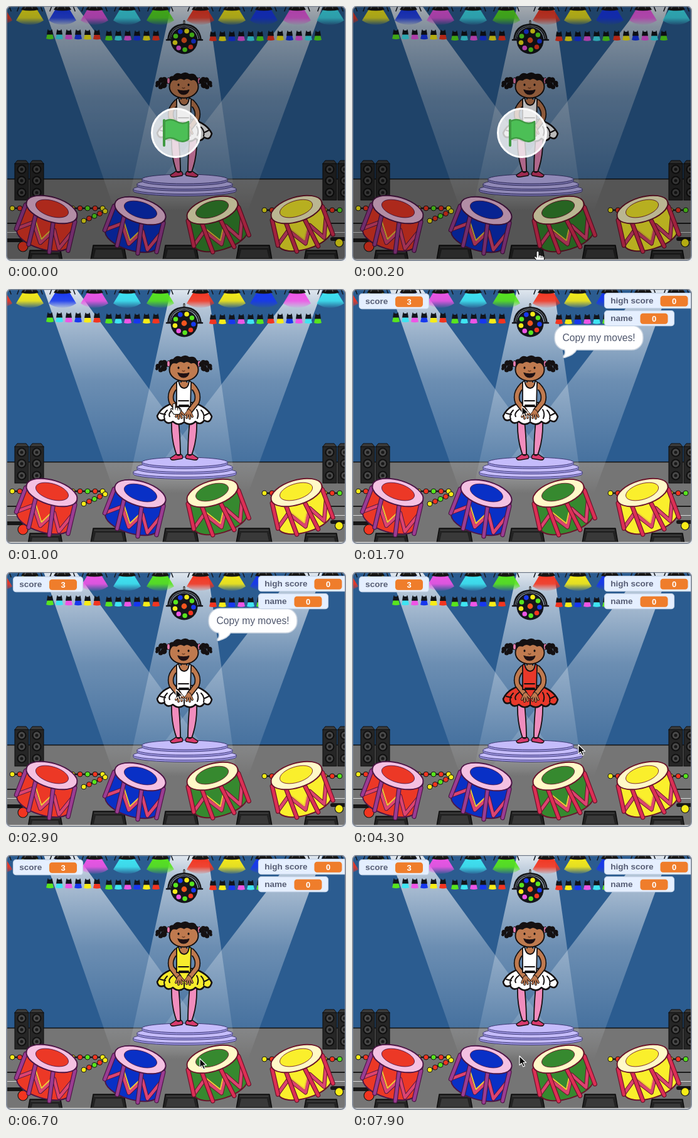
Animation of 542 by 406 pixels, one loop 8000 ms. Source, as an HTML page:

```html
<!DOCTYPE html>
<html lang="en">
<head>
<meta charset="utf-8">
<title>Copy my moves</title>
<style>
  html, body { margin: 0; width: 100%; height: 100%; overflow: hidden; background: #e9ebef; }
  svg { display: block; width: 542px; height: 406px; }
  text { font-family: "Liberation Sans", Arial, sans-serif; }
  .label { font-size: 13.5px; font-weight: bold; fill: #575e75; }
  .value { font-size: 13px; font-weight: bold; fill: #fff; text-anchor: middle; }
</style>
</head>
<body>
<svg id="stage" viewBox="0 0 542 406" xmlns="http://www.w3.org/2000/svg"></svg>
<script>
const LOOP = 8000;
const C = { red: '#f23520', yellow: '#f7ec18', blue: '#1738ee', magenta: '#ee55e6', cyan: '#3fe4f2', green: '#58e51e' };
const HUES = ['red', 'yellow', 'blue', 'magenta', 'cyan', 'green'];

const attrs = o => Object.entries(o).map(([k, v]) => ` ${k}="${v}"`).join('');
const el = (tag, o, inner = '') => `<${tag}${attrs(o)}>${inner}</${tag}>`;
const path = (d, fill, stroke = 'none', width = 1, more = {}) =>
  el('path', { d, fill, stroke, 'stroke-width': width, 'stroke-linejoin': 'round', 'stroke-linecap': 'round', ...more });
const line = (d, stroke, width, more) => path(d, 'none', stroke, width, more);
const rect = (x, y, width, height, fill, more = {}) => el('rect', { x, y, width, height, fill, ...more });
const oval = (cx, cy, rx, ry, fill, more = {}) => el('ellipse', { cx, cy, rx, ry, fill, ...more });
const dot = (x, y, r, fill, more) => oval(x, y, r, r, fill, more);
const group = (inner, o = {}) => el('g', o, inner);
const at = (x, y, inner) => group(inner, { transform: `translate(${x} ${y})` });

function fade(id, y1, y2, stops) {
  const inner = stops.map(([offset, color, alpha]) =>
    el('stop', { offset, 'stop-color': color, 'stop-opacity': alpha })).join('');
  return el('linearGradient', { id, gradientUnits: 'userSpaceOnUse', x1: 0, x2: 0, y1, y2 }, inner);
}

function defs() {
  const beam = fade('beam', 0, 325, [[0, '#fff', .86], [.1, '#f4f6f8', .68], [.45, '#e4ebf2', .35], [.84, '#dce6f0', .16], [1, '#fff', 0]]);
  const glows = HUES.map(h => fade('glow-' + h, 4, 31, [[0, C[h], 1], [.55, C[h], .9], [1, C[h], 0]])).join('');
  const clip = el('clipPath', { id: 'round' }, rect(1, 0, 540, 405, '#fff', { rx: 7 }));
  return el('defs', {}, beam + glows + clip);
}

const beams = () => ['M60 0H112L300 258L349 325H173Z', 'M263 0H322L368 325H192Z', 'M460 0H505L386 325H211L262 258Z']
  .map(d => path(d, 'url(#beam)')).join('');

function bigLamp(x, hue) {
  return at(x, 0,
    path('M-11 5H11L22 23Q12 30 0 30Q-12 30 -22 23Z', `url(#glow-${hue})`) +
    path('M-9 -2H9L14 6Q0 9 -14 6Z', '#151515') +
    line('M-6 0L-8 4M3 0L4 4', '#777', 1) +
    line('M-17 0L-20 8M17 0L20 8', '#151a22', 1.6));
}

function smallLamp(x, y, hue) {
  return at(x, y,
    path('M-4 5H4L6 13Q0 15 -6 13Z', C[hue]) +
    path('M-4 0H4L5 6.5H-5Z', '#12151b') + line('M-3 -1V2M3 -1V2', '#12151b', 1.5));
}

function lamps() {
  const big = [38, 90, 141, 193, 246, 310, 360, 411, 464, 517];
  const bigHues = ['yellow', 'blue', 'magenta', 'cyan', 'green', ...HUES.slice(0, 5)];
  let s = bigLamp(-12, 'red') + big.map((x, i) => bigLamp(x, bigHues[i])).join('');
  const back = ['green', 'cyan', 'magenta', 'blue', 'yellow', 'red'];
  [[70, 39, back, .1], [164, 41, back, 0], [330, 42, HUES, -.05], [422, 41, HUES, 0]].forEach(([x, y, hues, k]) =>
    hues.forEach((h, i) => s += smallLamp(x + i * 15, y + i * k, h)));
  return s;
}

function discoBall() {
  let s = line('M284 24V30', '#222', 3) + dot(284, 26, 2, '#777') +
    path('M257 54Q259 29 284 28Q309 29 312 54H307Q304 34 284 33Q264 34 262 54Z', '#16181c') +
    line('M260 52Q263 32 284 31Q306 32 309 52', '#8d939c', .9) +
    dot(284, 55, 21.5, '#15161c') + line('M256 54H264M304 54H313', '#15161c', 2.5) +
    dot(284, 54.5, 4.4, '#f2551f');
  const hues = ['blue', 'red', 'green', 'magenta', 'yellow', 'green', 'blue', 'yellow', 'green'];
  hues.forEach((h, i) => {
    const a = (i / hues.length) * Math.PI * 2 + .1;
    s += dot(284 + 15 * Math.cos(a), 54.5 + 15 * Math.sin(a), 3.8, C[h]);
  });
  return s;
}

function speaker(x) {
  let s = path('M0 5L4 0H18L22 5Z', '#3b3b3b', '#111', 1) + rect(0, 5, 22, 58, '#262626', { stroke: '#0d0d0d' });
  [14, 32, 51].forEach(y => s += dot(11, y, 7.6, '#111') + dot(11, y, 5.4, '#4a4a4a') + dot(11, y, 2.6, '#191919'));
  return at(x, 246, s);
}

function beads(x, n, step, y, slope) {
  const hues = ['yellow', 'red', 'green', 'red'];
  let s = line(`M${x} ${y}l${n * step} ${n * step * slope}`, '#161616', 2.5);
  for (let i = 0; i <= n; i++)
    s += dot(x + i * step, y + i * step * slope, 4, C[hues[i % 4]], { stroke: '#161616', 'stroke-width': 1 });
  return s;
}

const floorBox = (x, y) => at(x, y,
  path('M4 0H53L57 23H0Z', '#222', '#0c0c0c', 1.4) + path('M8 7H49L52 20H5Z', '#393939') + line('M6 3H51', '#555', 1));

function floor() {
  return rect(0, 275, 542, 131, '#757575') + line('M0 275.5H542', '#111', 1.4) +
    [14, 38, 505, 529].map(speaker).join('') +
    line('M0 346H20M518 346H542', '#1c1c1c', 2) + line('M0 360.5H18M520 360.5H542', '#d9d9d9', 1.2) +
    beads(10, 12, 12, 322, 0) + beads(124, 4, 8.5, 342, -.45) + beads(412, 10, 12, 325, 0) +
    line('M0 373H24M520 371H542', '#171717', 6) +
    dot(27, 383, 8, C.red, { stroke: '#161616', 'stroke-width': 1.2 }) +
    dot(531, 377, 6.5, C.yellow, { stroke: '#161616', 'stroke-width': 1.2 }) +
    [[34, 389], [135, 381], [250, 381], [367, 381], [474, 389]].map(p => floorBox(...p)).join('') +
    line('M0 403.5H542', '#ddd', 1.5);
}

function platform() {
  const edge = { stroke: '#3d3874', 'stroke-width': 1 };
  const tier = (y, rx, ry, h) =>
    path(`M${285 - rx} ${y}v${h}a${rx} ${ry} 0 0 0 ${2 * rx} 0v${-h}Z`, '#9d95e2', '#3d3874') +
    oval(285, y, rx, ry, '#c5bcfb', edge);
  return tier(291.5, 82, 8, 3) + tier(283.5, 76, 8, 3) + tier(275.5, 68, 7.5, 3);
}

// Drawn upright, then tilted to either side.
function drum(x, y, tilt, skin, rim, stick, edge) {
  const bars = [[-42, 5, -45, 46], [-22, 16, -19, 64], [8, 19, 16, 66], [41, 8, 44, 55]];
  const bar = (w, color) => bars.map(([a, b, c, d]) => line(`M${a} ${b}L${c} ${d}`, color, w)).join('');
  const zig = 'M-43 44L-22 28L-2 56L13 30L29 56L42 24';
  const s =
    path('M-42 0L-44 46A44 19 0 0 0 44 46L42 0Z', skin, edge, 2) +
    line(zig, edge, 6.6) + line(zig, '#dc4470', 4.6) + line('M-20 24L-2 50L11 27', '#f0c83a', 2) +
    bar(7.4, edge) + bar(5, stick) +
    oval(0, 0, 42, 19.5, rim, { stroke: edge, 'stroke-width': 2 }) +
    oval(0, -1.5, 27, 12.5, skin, { stroke: edge, 'stroke-width': .8 });
  return group(s, { transform: `translate(${x} ${y}) rotate(${tilt})` });
}

function drums() {
  const warm = ['#f4c1e2', '#9b3c92', '#4d1647'], cool = ['#fff9c8', '#dc2f55', '#6b142b'];
  return drum(73, 324, 17, '#ec3826', ...warm) + drum(214, 326, 17, '#0930c6', ...warm) +
    drum(329, 325, -17, '#36892f', ...cool) + drum(463, 324, -17, '#faef2c', ...cool);
}

function pigtail(side) {
  const lumps = [[-28, 120, 4], [-32, 126, 5], [-36, 118, 4.4], [-41, 123, 4], [-31, 117, 4], [-37, 129, 3.6], [-43, 127, 2.4]];
  return lumps.map(([x, y, r]) => dot(283.5 + side * x, y, r, '#151112')).join('') +
    oval(283.5 + side * 24.5, 119, 2.4, 4.8, '#ee7fb4', { stroke: '#151112' });
}

function dancer() {
  const ink = '#151112', skin = '#bf7a4f', pink = '#f08dbd';
  const arm = 'M272 153Q259 166 264 180L275 194M296 153Q309 166 304 180L293 194';
  const hands = 'M275 194L271 203M276 195L275 206M277 195L280 205M277 193L283 200M293 194L297 203M292 195L293 206M291 195L288 205M291 193L286 200';
  const mirror = d => d + group(d, { transform: 'matrix(-1 0 0 1 568 0)' });
  const leg = path('M264 210Q263 240 272 264H278Q278 240 275 210Z', pink, ink, 1.8);
  const shoe = path('M271 263Q267 266 262 269Q262 273 269 272L281 270Q283 266 279 263Q275 267 271 263Z', '#d83a6d', ink, 1.4);
  return mirror(leg + shoe) +
    path('M268 181Q248 187 241 202Q243 212 252 208Q257 217 266 211Q275 219 284 212Q294 219 302 211Q310 218 316 209Q325 215 328 203Q321 188 299 181Z', 'var(--dress)', ink, 2.6) +
    line('M257 193Q250 200 253 207M266 192Q258 198 261 203M311 193Q317 199 315 207M304 192Q308 198 305 206M284 203V210M246 198L254 200M323 198L317 201', ink, 2) +
    path('M279 144H288V152H279Z', skin, ink, 1.6) +
    line(arm, ink, 9.6) + line(arm, skin, 6.2) +
    path('M273 149Q267 151 270 160H298Q300 151 294 149Z', skin) +
    path('M272 148L275 146Q277 158 284 158Q291 158 292 146L295 148L294 187H272Z', 'var(--dress)', ink, 1.8) +
    line('M275 178H291M276 185H291', ink, 1.8) +
    line(hands, ink, 3.8) + line(hands, skin, 2.2) +
    oval(283.5, 128.5, 23, 18, skin, { stroke: ink, 'stroke-width': 2 }) +
    path('M261 122Q258 112 267 112Q272 105 279 109Q286 104 292 109Q301 107 303 113Q309 117 306 122Q301 115 295 118Q289 113 284 117Q277 113 272 118Q264 116 261 122Z', ink, ink, 1.6) +
    pigtail(1) + pigtail(-1) +
    oval(275, 125.5, 1.5, 2, ink) + oval(291, 125.5, 1.5, 2, ink) + line('M281 130Q283 132 285 130', '#704026', 1.2) +
    path('M274 133.5Q283 136.5 292 133.5Q290 141 283 141Q276 141 274 133.5Z', '#221013', ink, 1);
}

function monitor(x, y, w, label, value, vx) {
  return rect(x, y, w, 24, '#e5efff', { rx: 4.5, stroke: '#c4d3e6', 'stroke-width': 1.2 }) +
    el('text', { class: 'label', x: x + 9.7, y: y + 16.7 }, label) +
    rect(vx, y + 4, 44, 17, '#ef7d2b', { rx: 4.5 }) +
    el('text', { class: 'value', x: vx + 22, y: y + 17 }, value);
}

const monitors = () => at(.5, .7, monitor(11, 7, 111, 'score', 3, 68.5) +
  monitor(402, 6, 145, 'high score', 0, 491) + monitor(402, 34, 111, 'name', 0, 459));

const bubble = () =>
  path('M341 58H446A18 18 0 0 1 464 76V79A18 18 0 0 1 446 97H358Q354 105 340 109Q336 110 337 107Q341 103 339 97A18 18 0 0 1 323 79V76A18 18 0 0 1 341 58Z', '#fff', '#c9d3df', 1.6) +
  el('text', { x: 335.5, y: 82.5, 'font-size': 15.6, fill: '#4f576d' }, 'Copy my moves!');

const flagButton = () => rect(0, 0, 542, 406, '#000', { opacity: .27 }) +
  dot(271, 202, 38.5, '#fff', { 'fill-opacity': .75, stroke: '#fff', 'stroke-width': 3 }) +
  path('M252 184Q262 178 272 184T291 184V212Q282 219 272 213T252 213Z', '#4cbf56', '#3f9a42', 2.6) +
  line('M252 182V222', '#3f9a42', 4);

const hand = path('M-2 1.5Q0 -1 2 1.5V7Q4 5 5.4 7.4Q7.4 6 8.4 8.4Q10.6 7.6 10.6 10V13Q10 16 8 17.5H-.5L-5 11Q-6 7.6 -3.4 8.6L-2 10Z', '#fff', '#111', 1.2) +
  line('M2 7V10M5.4 8V11M8.4 9V11', '#111', .9);
const arrow = path('M0 0V14.6L3.4 11.5L5.8 17L8.4 15.9L6 10.5H10.6Z', '#0b0b0b', '#fff', 1.1);

const stage = document.getElementById('stage');
stage.innerHTML = defs() + group(
  rect(0, 0, 542, 276, '#2b5c90') + floor() + beams() + lamps() + discoBall() + platform() + drums() +
  group(dancer(), { id: 'dancer' }) + group(bubble(), { id: 'bubble' }) + group(monitors(), { id: 'monitors' }) +
  group(flagButton(), { id: 'button' }) +
  group(group(hand, { id: 'hand' }) + group(arrow, { id: 'arrow' }), { id: 'cursor' }),
  { 'clip-path': 'url(#round)' }) +
  rect(1, .5, 540, 404.5, 'none', { rx: 7, stroke: '#858d99', 'stroke-width': 1.8 });

// time, x, y of the pointer tip
const TRACK = [
  [200, 296, 390], [500, 264, 179], [700, 264, 179], [1000, 268, 182], [1300, 271, 187], [2900, 271, 187],
  [3500, 354, 268], [4200, 354, 268], [4300, 361, 275], [5100, 350, 355], [5400, 309, 324], [6700, 309, 324],
  [7300, 267, 320]
];

function pointer(t) {
  const i = TRACK.findIndex(k => k[0] > t);
  if (i < 0) return TRACK[TRACK.length - 1].slice(1);
  if (i === 0) return TRACK[0].slice(1);
  const [a, b] = [TRACK[i - 1], TRACK[i]];
  const k = (t - a[0]) / (b[0] - a[0]);
  return [a[1] + (b[1] - a[1]) * k, a[2] + (b[2] - a[2]) * k];
}

// After the greeting the dancer shows three colours, one per beat, then rests in white.
const GREET = 1100, MOVES = 3000, BEAT = 1270;
const DRESS = ['#1f43cf', '#e8382a', '#f7ec2c'];

const part = Object.fromEntries(['dancer', 'bubble', 'monitors', 'button', 'cursor', 'hand', 'arrow']
  .map(id => [id, document.getElementById(id)]));
const show = (name, on) => { part[name].style.display = on ? '' : 'none'; };

function draw(now) {
  const t = Math.floor((now % LOOP) / 100) * 100;
  show('button', t < 1000);
  show('monitors', t >= GREET);
  show('bubble', t >= GREET && t < MOVES);
  show('cursor', t >= 200);
  show('hand', t < GREET);
  show('arrow', t >= GREET);
  part.dancer.style.setProperty('--dress', DRESS[Math.floor((t - MOVES) / BEAT)] || '#fff');
  part.cursor.setAttribute('transform', `translate(${pointer(t).map(v => v.toFixed(1)).join(' ')})`);
}

const start = performance.now();
function tick(now) {
  draw(Math.max(0, now - start));
  requestAnimationFrame(tick);
}
draw(0);
requestAnimationFrame(tick);
</script>
</body>
</html>
```
